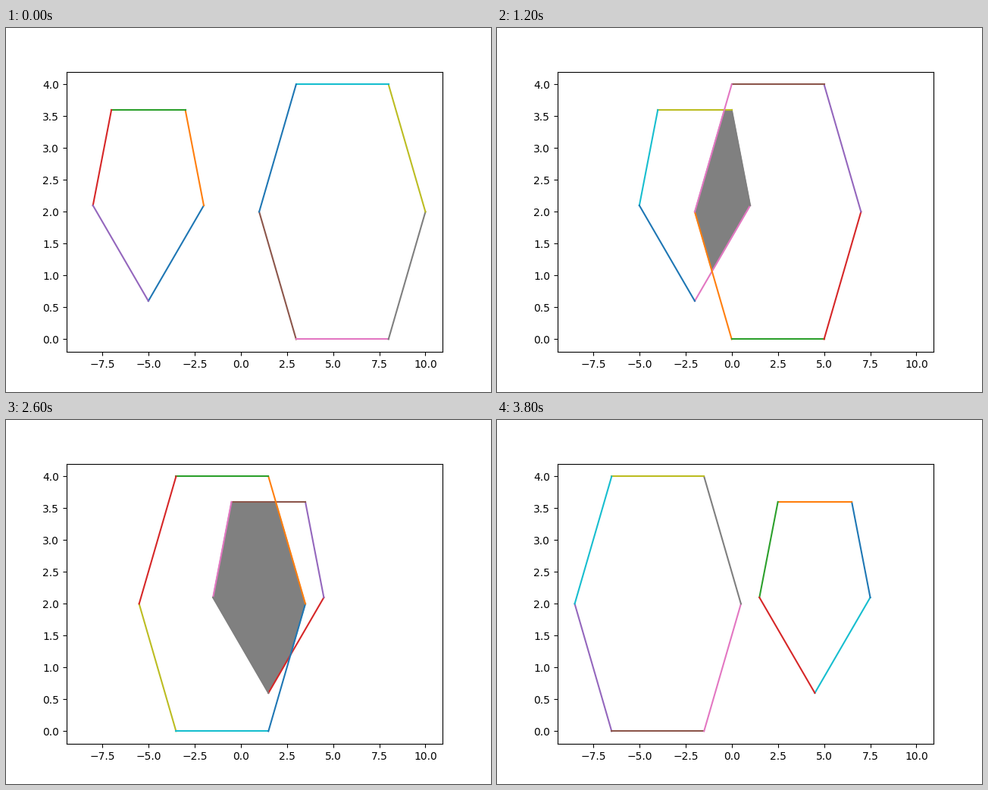
A matplotlib script for the animation above (4 s loop, 640 px wide and 480 px high).

```python
import matplotlib.pyplot as plt
import numpy as np
from matplotlib.animation import FuncAnimation
from matplotlib.patches import Polygon

FRAMES = 20
STEP = 0.5

# Both polygons run counter-clockwise.
PENTAGON = np.array([(-5, 0.6), (-2, 2.1), (-3, 3.6), (-7, 3.6), (-8, 2.1)])
HEXAGON = np.array([(1, 2), (3, 0), (8, 0), (10, 2), (8, 4), (3, 4)], float)


def edges(poly):
    return list(zip(poly, np.roll(poly, -1, axis=0)))


def side(p, a, b):
    """Positive when p lies to the left of the line from a to b."""
    return (b[0] - a[0]) * (p[1] - a[1]) - (b[1] - a[1]) * (p[0] - a[0])


def intersect(subject, clip):
    """Overlap of two convex polygons (Sutherland-Hodgman)."""
    points = list(subject)
    for a, b in edges(clip):
        kept = []
        for p, q in zip(points, points[1:] + points[:1]):
            sp, sq = side(p, a, b), side(q, a, b)
            if sp >= 0:
                kept.append(p)
            if sp * sq < 0:
                kept.append(p + (q - p) * sp / (sp - sq))
        points = kept
    return points


fig, ax = plt.subplots(figsize=(6.4, 4.8), dpi=100)
ax.set_xlim(-9.425, 10.925)
ax.set_ylim(-0.2, 4.2)

overlap = ax.add_patch(Polygon(PENTAGON, color="gray", visible=False))
lines = [ax.plot([], [])[0] for _ in range(len(PENTAGON) + len(HEXAGON))]


def update(i):
    shift = np.array([STEP * i, 0])
    pentagon, hexagon = PENTAGON + shift, HEXAGON - shift

    for k, (line, (a, b)) in enumerate(zip(lines, edges(pentagon) + edges(hexagon))):
        line.set_data([a[0], b[0]], [a[1], b[1]])
        # The colour cycle carries on from one step to the next.
        line.set_color(f"C{(len(lines) * i + k) % 10}")

    shared = intersect(pentagon, hexagon)
    overlap.set_visible(len(shared) > 2)
    if len(shared) > 2:
        overlap.set_xy(shared)
    return [overlap, *lines]


anim = FuncAnimation(fig, update, frames=FRAMES, interval=200, repeat=True,
                     repeat_delay=0)
plt.show()
```
